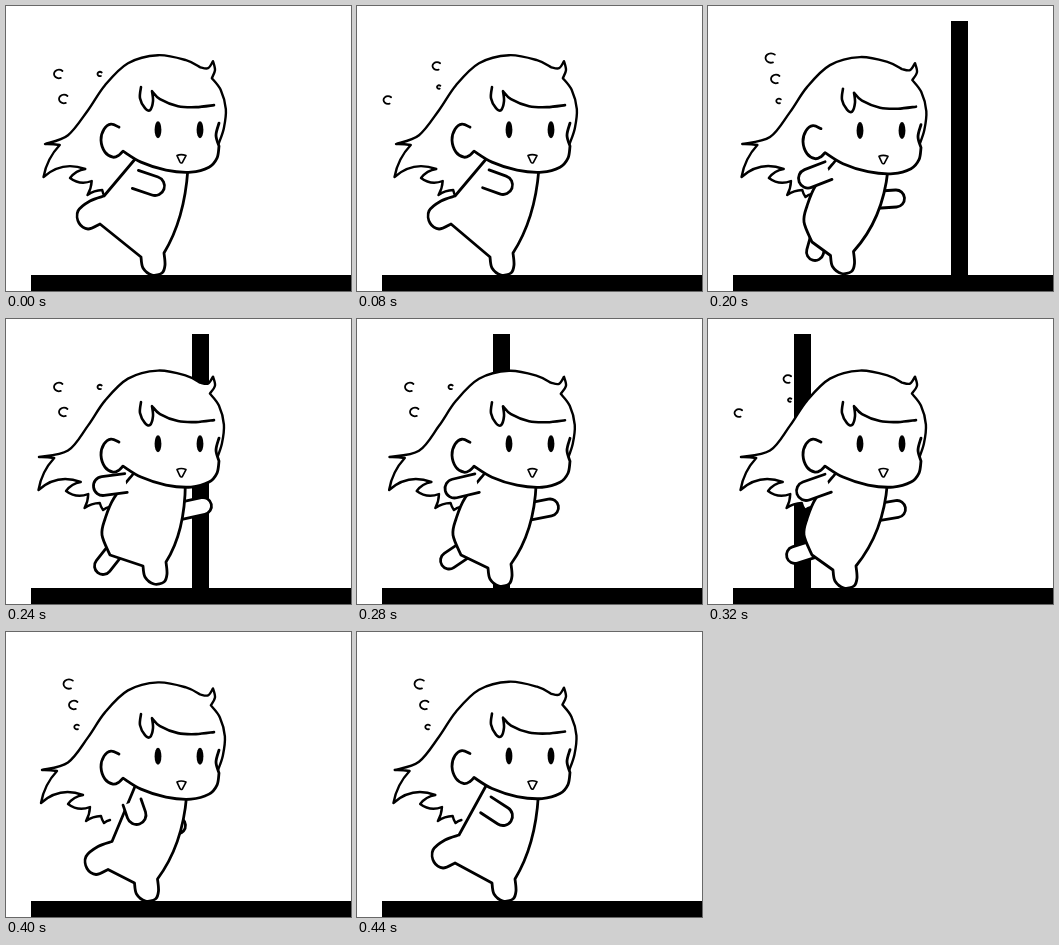
These frames come from a looping animation (345 px wide and 285 px high, 480 ms). An HTML page with a canvas:

```html
<!DOCTYPE html>
<html lang="en">
<head>
<meta charset="utf-8">
<title>Running girl</title>
<style>
  html, body { margin: 0; width: 100%; height: 100%; overflow: hidden; background: #fff; }
  canvas { display: block; }
</style>
</head>
<body>
<canvas id="stage" width="345" height="285"></canvas>
<script>
const ctx = document.getElementById('stage').getContext('2d');
const STEP = 40, STEPS = 12, TURN = Math.PI * 2;

// Key poses of the stride; limbs move straight between them
const keys = [
  { at: 0, foot: [148, 260], heel: [76, 213], near: [149, 180], far: [160, 190] },
  { at: 2, foot: [146, 260], heel: [76, 213], near: [146, 179], far: [160, 190] },
  { at: 4, foot: [121, 261], heel: [117, 245], near: [103, 178], far: [179, 198] },
  { at: 6, foot: [150, 256], heel: [97, 247], near: [97, 167], far: [197, 187] },
  { at: 8, foot: [138, 260], heel: [87, 236], near: [98, 172], far: [189, 190] },
  { at: 9, foot: [135, 260], heel: [88, 239], near: [115, 182], far: [182, 197] },
  { at: 11, foot: [148, 260], heel: [80, 226], near: [146, 184], far: [160, 190] }
];

function pose(n) {
  const i = keys.findLastIndex(k => k.at <= n);
  const a = keys[i], b = keys[i + 1] || { ...keys[0], at: STEPS };
  const t = (n - a.at) / (b.at - a.at);
  const between = part => a[part].map((v, j) => v + (b[part][j] - v) * t);
  return { foot: between('foot'), heel: between('heel'), near: between('near'), far: between('far') };
}

// "x,y x,y / x,y": smooth runs of points, with a corner at each slash
const parse = text => text.split('/').map(run =>
  run.trim().split(/\s+/).map(p => p.split(',').map(Number)));
const shift = (points, [dx, dy]) => points.map(([x, y]) => [x + dx, y + dy]);

// Catmull-Rom curve through each run
function trace(runs) {
  const path = new Path2D();
  let last;
  for (const run of runs) {
    const p = last ? [last, ...run] : run;
    if (!last) path.moveTo(...p[0]);
    for (let i = 0; i < p.length - 1; i++) {
      const a = p[i - 1] || p[i], b = p[i], c = p[i + 1], d = p[i + 2] || c;
      path.bezierCurveTo(b[0] + (c[0] - a[0]) / 6, b[1] + (c[1] - a[1]) / 6,
        c[0] - (d[0] - b[0]) / 6, c[1] - (d[1] - b[1]) / 6, ...c);
    }
    last = p[p.length - 1];
  }
  return path;
}

function ink(path, width, filled = true) {
  if (filled) {
    ctx.fillStyle = '#fff';
    ctx.fill(path);
  }
  ctx.lineWidth = width;
  ctx.stroke(path);
}

// Round-ended limb, open at the joint
function drawLimb([x, y], [ex, ey], r) {
  const a = Math.atan2(ey - y, ex - x), q = TURN / 4;
  const path = new Path2D();
  path.moveTo(x + r * Math.cos(a - q), y + r * Math.sin(a - q));
  path.arc(ex, ey, r, a - q, a + q);
  path.lineTo(x + r * Math.cos(a + q), y + r * Math.sin(a + q));
  ink(path, 2.8);
}

const [footShape] = parse('-13,-9 -11,2 -2,9 8,7 11,-1 10,-13');
const [heelShape] = parse('22,-23 8,-18 -4,-8 -3,4 6,10 18,5');
const [backLine] = parse('128,154 108,179 99,200 96,216 104,236');

function drawBody(n, drop) {
  const { foot, heel, near, far } = pose(n);
  const lifted = n < 4 || n > 9, hip = [112, 228];
  drawLimb([165, 194], far, 8.5);
  if (!lifted) drawLimb(hip, heel, 8.5);

  const leg = shift(heelShape, heel);
  const back = lifted ? [[[130, 152], leg[0]], leg.slice(1)] : [backLine];
  const [ankle, ...toes] = shift(footShape, foot);
  const path = trace([...back, [ankle], toes]);
  path.quadraticCurveTo(137 + foot[0] * .28, 213, 182 - drop, 164);
  ink(path, 2.8);

  if (n === 4) drawLimb(hip, heel, 10);
  const reach = near[0] - 97;
  drawLimb([120 + reach * .18, 164 + reach * .18], near, 9.5);
}

const [side, tuft, crown] = parse(
  '213,137 218,122 220,103 215,84 206,72 / 209,64 207,55 / 202,62 194,61');
const [slope] = parse('180,54 152,49 122,57 99,79 82,104 62,129');
const [tips] = parse('36,138 51,139 35,171 77,163 62,172 84,175 80,189 95,184 98,191 104,188');

function drawHair(sway, drop) {
  const low = points => shift(points, [0, drop]);
  const ends = tips.map(([x, y], i) => [x + sway * (3.5 - i * .3), y]);
  const path = trace([shift(side, [-drop * .8, drop]), low(tuft), low(crown), [...low(slope), ends[0]]]);
  // Each lock bows by a share of its length
  [.05, -.15, .3, -.2, -.28, .12, .15, -.1, .1].forEach((bow, i) => {
    const [ax, ay] = ends[i], [bx, by] = ends[i + 1];
    path.quadraticCurveTo((ax + bx) / 2 + (by - ay) * bow, (ay + by) / 2 - (bx - ax) * bow, bx, by);
  });
  ink(path, 2.4);
}

const face = parse('113,121 105,118 98,123 95,134 99,146 107,151 113,149 117,145'
  + ' / 135,156 160,164 185,166 203,161 211,152 213,140 / 210,129 213,117');
const fringe = parse('135,81 134,92 139,102 144,104 147,95 146,85 / 154,93 172,100 190,101 208,99');

function drawFace(drop) {
  ctx.save();
  ctx.translate(0, drop * .8);
  ink(trace(face), 2.8);
  ink(trace(fringe), 2.6, false);
  ctx.translate(0, -drop * .4);
  ctx.fillStyle = '#000';
  for (const x of [152, 194]) {
    ctx.beginPath();
    ctx.ellipse(x, 123.7, 3.4, 8.5, 0, 0, TURN);
    ctx.fill();
  }
  ink(new Path2D('M171 149.5Q175 147.5 180 149.5L176.3 156.5Q175 157.5 174 156Z'), 1.6);
  ctx.restore();
}

// Three arrangements of sweat drops: x, y, size
const sweat = [
  [[53, 68, 5], [58, 93, 5], [94, 68, 2.5]],
  [[80, 60, 4.5], [31, 94, 4.5], [82, 81, 2]],
  [[63, 52, 5.5], [68, 73, 5], [71, 95, 2.7]]
];

function drawDrop([x, y, s]) {
  const path = new Path2D();
  path.ellipse(x, y, s, s * .85, 0, -.8, 1.2, true);
  ink(path, 1.8, false);
}

function drawScene(n) {
  const sway = Math.cos(TURN * (n - 1) / STEPS), drop = 1.4 * (1 - sway);
  ctx.fillStyle = '#fff';
  ctx.fillRect(0, 0, 345, 285);
  ctx.fillStyle = '#000';
  ctx.fillRect(25, 269, 320, 16);
  // The post rushes past, a little slower once she has met it
  const post = 186 - (n - 6) * (n < 6 ? 57 : 50);
  if (post > 25 && post < 328) ctx.fillRect(post, 15, 17, 254);
  sweat[Math.floor(n / 2) % 3].forEach(drawDrop);
  drawHair(sway, drop);
  drawBody(n, drop);
  drawFace(drop);
}

ctx.lineCap = ctx.lineJoin = 'round';
let shown = -1;
function tick() {
  const n = Math.floor(performance.now() / STEP) % STEPS;
  if (n !== shown) drawScene(shown = n);
  requestAnimationFrame(tick);
}
tick();
</script>
</body>
</html>
```
